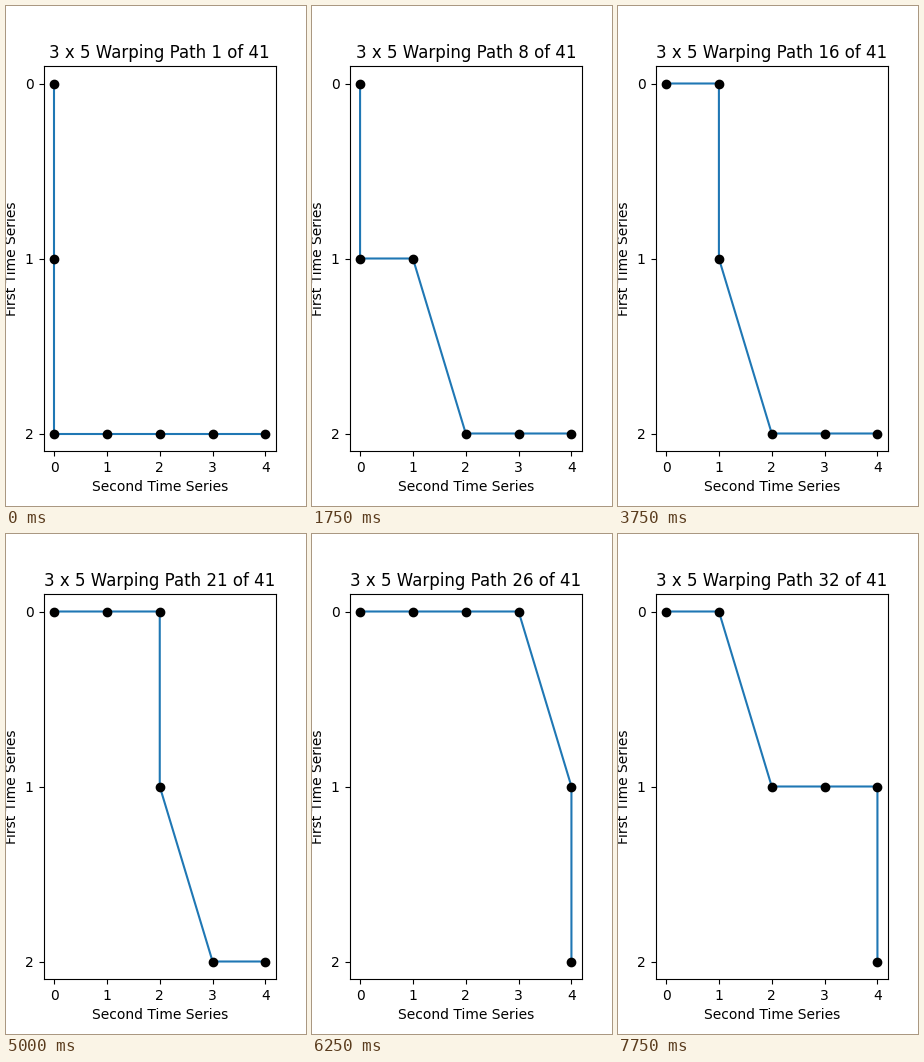
These frames come from a looping animation (300x500 px, 8000 ms). A matplotlib script:

```python
import matplotlib.pyplot as plt
from matplotlib.animation import FuncAnimation

ROWS, COLS = 3, 5
SHOWN = 32
STEPS = [(1, 0), (0, 1), (1, 1)]  # down, right, diagonal


def warping_paths(i=0, j=0):
    """Yield every path from (i, j) to the last cell, depth first."""
    if (i, j) == (ROWS - 1, COLS - 1):
        yield [(i, j)]
        return
    for di, dj in STEPS:
        if i + di < ROWS and j + dj < COLS:
            for rest in warping_paths(i + di, j + dj):
                yield [(i, j)] + rest


paths = list(warping_paths())

fig, ax = plt.subplots(figsize=(3, 5), dpi=100)
line, = ax.plot([], [], "-o", color="C0", mfc="k", mec="k")
title = ax.set_title("")
ax.set_xlabel("Second Time Series")
ax.set_ylabel("First Time Series")
ax.set_xticks(range(COLS))
ax.set_yticks(range(ROWS))

# 5 % margin around the grid, first row on top
mx, my = 0.05 * (COLS - 1), 0.05 * (ROWS - 1)
ax.set_xlim(-mx, COLS - 1 + mx)
ax.set_ylim(ROWS - 1 + my, -my)


def draw(k):
    rows, cols = zip(*paths[k])
    line.set_data(cols, rows)
    title.set_text(f"{ROWS} x {COLS} Warping Path {k + 1} of {len(paths)}")
    return line, title


anim = FuncAnimation(fig, draw, frames=SHOWN, interval=250,
                     repeat=True, repeat_delay=0, blit=False)
plt.show()
```
